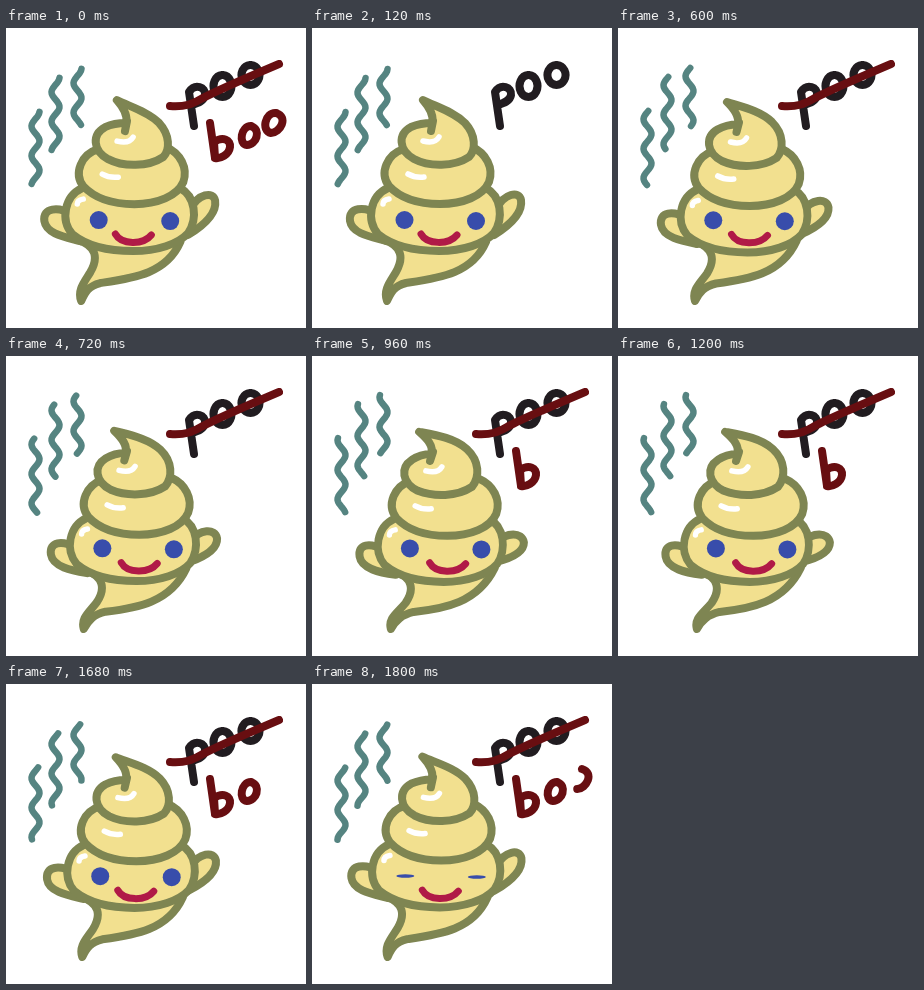
These frames come from a looping animation (300x300 px, 1920 ms). An HTML page:

```html
<!DOCTYPE html>
<html lang="en">
<head>
<meta charset="utf-8">
<title>Boo</title>
<style>
  html, body { margin: 0; width: 100%; height: 100%; overflow: hidden; background: #fff; }
  svg { display: block; width: 100vw; height: 100vh; }
  path { fill: none; stroke-width: 8; stroke-linecap: round; stroke-linejoin: round; }
  .skin path { fill: #f2e08f; stroke: #7e8552; }
  .skin .shine { fill: none; stroke: #fff; stroke-width: 5.5; }
  #steam path { stroke: #558481; stroke-width: 6.5; }
  #eyes { fill: #384dab; }
  #smile { stroke: #b01a47; stroke-width: 7; }
  .black { stroke: #211c20; }
  .red { stroke: #680e11; }
</style>
</head>
<body>
<svg viewBox="0 0 300 300">
  <filter id="crayon" x="0" y="0" width="300" height="300" filterUnits="userSpaceOnUse" color-interpolation-filters="sRGB">
    <feTurbulence type="fractalNoise" baseFrequency=".4" numOctaves="1" seed="4"/>
    <feDisplacementMap in="SourceGraphic" scale="1.5" xChannelSelector="R" yChannelSelector="G"/>
  </filter>
  <g filter="url(#crayon)">
    <g id="steam"><path/><path/><path/></g>

    <g class="skin">
      <path id="tail"/>
      <path id="armL"/>
      <path id="armR"/>
      <g id="face">
        <path d="M76 160C58 168 54 192 66 206C82 219 104 223 127 223C151 223 172 216 182 205C192 190 189 168 174 160"/>
        <path class="shine" d="M71 176Q71 172 77 171"/>
      </g>
      <g id="middle">
        <path d="M92 121C75 126 67 145 77 158C90 172 108 176 128 176C151 176 171 168 177 154C182 140 174 125 160 119"/>
        <path class="shine" d="M96 146Q103 150 112 149"/>
      </g>
      <path id="top"/>
      <path id="topShine" class="shine" d="M111 113Q123 116 127 109"/>
    </g>

    <g id="eyes"><ellipse cx="92.5" cy="192" rx="9"/><ellipse cx="164" cy="193" rx="9"/></g>
    <path id="smile" d="M109 206C115 217 137 217 145 207"/>

    <path class="black" d="M188 98L183 64C189 55 200 59 199 67C198 73 192 75 186 77"/>
    <path class="black" d="M217 47A9 11 0 1 1 216 47"/>
    <path class="black" d="M245 37A9 10 0 1 1 244 37"/>
    <path id="strike" class="red" pathLength="1" d="M164 78C180 79 186 76 195 71C210 63 240 50 273 36"/>
    <path id="b" class="red" pathLength="1" d="M204 95L209 130L208 114C217 108 225 112 224 119C223 127 214 131 209 130"/>
    <path id="o1" class="red" pathLength="1" d="M245 98C256 102 250 117 241 117C232 116 235 98 245 98"/>
    <path id="o2" class="red" pathLength="1" d="M270 85C283 89 274 105 265 105C255 103 259 84 270 85"/>
  </g>
</svg>
<script>
  const STEP = 120, STEPS = 16;
  const el = id => document.getElementById(id);
  const clamp = v => Math.max(0, Math.min(1, v));

  // x, top and bottom of each wisp of steam
  const wisps = [[30, 84, 157], [50, 50, 122], [72, 41, 98]];

  // Left and right extremes of the parts that bend
  const poses = {
    top: [
      "M111 72C125 79 142 84 153 95C164 107 164 122 157 129C142 139 117 139 102 131C86 122 86 106 99 99C106 96 114 95 120 95C122 88 118 80 111 72ZM121 93L119 103",
      "M107 76C124 79 143 82 155 93C168 105 168 121 160 131C145 141 122 141 106 135C90 127 88 112 100 104C107 99 114 98 119 98C122 90 115 83 107 76ZM121 96L118 105"
    ],
    tail: [
      "M72 212C90 218 92 230 84 244C78 254 71 262 75 273C79 264 82 258 94 255C127 250 160 246 174 214",
      "M84 216C101 222 103 234 94 247C86 257 76 262 79 273C84 264 90 259 102 256C132 253 166 247 183 212"
    ],
    armL: [
      "M66 186C52 178 36 179 38 193C40 206 60 209 74 213",
      "M72 194C58 187 46 188 48 201C50 213 68 217 84 219"
    ],
    armR: [
      "M185 180C192 166 207 162 209 172C211 185 198 197 182 207",
      "M186 186C194 177 210 176 212 187C212 198 197 203 183 206"
    ]
  };

  function bend(id, s) {
    const [from, to] = poses[id];
    const ends = to.match(/\d+/g);
    let i = 0;
    el(id).setAttribute("d", from.replace(/\d+/g, n => (+n + (ends[i++] - n) * s).toFixed(2)));
  }

  function move(id, dx, dy, scale = 1) {
    el(id).setAttribute("transform", `translate(${dx} ${dy}) scale(${scale} 1)`);
  }

  function reveal(id, amount) {
    const path = el(id);
    path.style.visibility = amount > 0 ? "visible" : "hidden";
    path.style.strokeDasharray = amount < 1 ? `${amount} 2` : "none";
  }

  function wisp([x, top, bottom], s) {
    let d = "";
    for (let y = top - 2 * s; y <= bottom; y += 2) {
      const wave = 4 * Math.cos((y - top + 15 * s) / 29.5 * 2 * Math.PI);
      d += `${d ? "L" : "M"}${(x + wave - .5).toFixed(2)} ${y.toFixed(2)}`;
    }
    return d;
  }

  function draw(step) {
    const s = (1 - Math.cos((step - 1) / STEPS * 2 * Math.PI)) / 2;

    [...el("steam").children].forEach((p, i) => p.setAttribute("d", wisp(wisps[i], s)));
    Object.keys(poses).forEach(id => bend(id, s));
    move("face", 8.8 * s, 3 * s, 1 - .03 * s);
    move("middle", 7.5 * s, 4 * s);
    move("topShine", 3 * s, 2 * s);
    move("eyes", 5.6 * s, .5 * s);
    move("smile", 9 * s, .8 * s);

    const blink = step === 15;
    for (const eye of el("eyes").children) eye.setAttribute("ry", blink ? 1.8 : 9);

    const done = step === 0;
    reveal("strike", done ? 1 : clamp((step - 1) / 4));
    reveal("b", done ? 1 : clamp((step - 6) / 2));
    reveal("o1", done ? 1 : clamp((step - 11) / 2));
    reveal("o2", done ? 1 : clamp((step - 14) / 2));
  }

  const start = performance.now();
  function tick() {
    draw(Math.floor((performance.now() - start) / STEP) % STEPS);
    requestAnimationFrame(tick);
  }
  tick();
</script>
</body>
</html>
```
